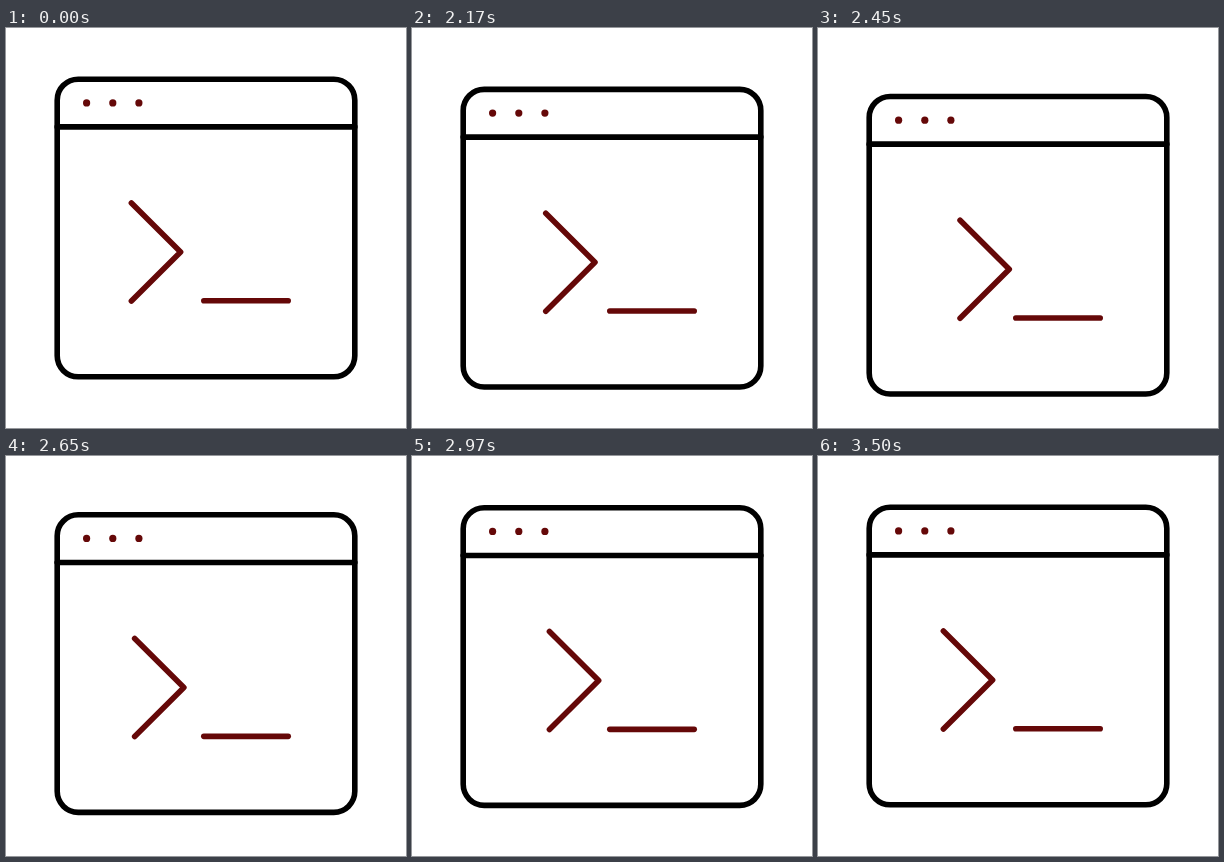
An HTML page that plays this animation: 400 by 400 pixels, repeating every 3520 ms.

```html
<!DOCTYPE html>
<html>
<head>
<meta charset="utf-8">
<style>
  html, body { margin: 0; height: 100%; overflow: hidden; background: #fff; }
  svg { display: block; width: 100vw; height: 100vh; }
  g { fill: none; stroke: #000; stroke-width: 5.6; stroke-linecap: round; stroke-linejoin: round; }
  .accent { stroke: #650808; }
  circle { fill: #650808; stroke: none; }
</style>
</head>
<body>
<svg viewBox="0 0 400 400">
  <g id="terminal">
    <path d="M51.2 98.9H348.8"/>
    <rect x="51.2" y="51.2" width="297.6" height="297.6" rx="21"/>
    <circle cx="80.6" cy="74.9" r="3.6"/>
    <circle cx="106.8" cy="74.9" r="3.6"/>
    <circle cx="132.9" cy="74.9" r="3.6"/>
    <path id="prompt" class="accent" d="M125.4 175L174.6 224L125.4 273"/>
    <path class="accent" d="M197.8 272.8H282.2"/>
  </g>
</svg>
<script>
  const LOOP = 3520, START = 1995, STEP = 25, BEAT = 375, SHIFT = 18.6;
  const terminal = document.getElementById('terminal');
  const prompt = document.getElementById('prompt');

  const smooth = s => s * s * (3 - 2 * s);

  // Cubic bezier easing with handles (x1, 0) and (x2, 1)
  function ease(u, x1, x2) {
    let lo = 0, hi = 1;
    for (let i = 0; i < 24; i++) {
      const s = (lo + hi) / 2, r = 1 - s;
      if (3 * x1 * s * r * r + 3 * x2 * s * s * r + s ** 3 < u) lo = s;
      else hi = s;
    }
    return smooth((lo + hi) / 2);
  }

  function drop(t) {
    if (t < BEAT) return SHIFT * ease(t / BEAT, 0.333, 0.5);
    if (t < 3 * BEAT) return SHIFT * (1 - ease((t - BEAT) / (2 * BEAT), 0.22, 0.284));
    return 0;
  }

  // Two equal nudges to the right and back
  function nudge(t) {
    const phase = (t / BEAT) % 2;
    return SHIFT * smooth(phase < 1 ? phase : 2 - phase);
  }

  function draw(now) {
    const elapsed = now % LOOP - START;
    const t = Math.min(Math.max(Math.floor(elapsed / STEP) * STEP, 0), 4 * BEAT);
    terminal.setAttribute('transform', `translate(0 ${drop(t)})`);
    prompt.setAttribute('transform', `translate(${nudge(t)} 0)`);
  }

  const begin = performance.now();
  function tick() {
    draw(performance.now() - begin);
    requestAnimationFrame(tick);
  }
  tick();
</script>
</body>
</html>
```
